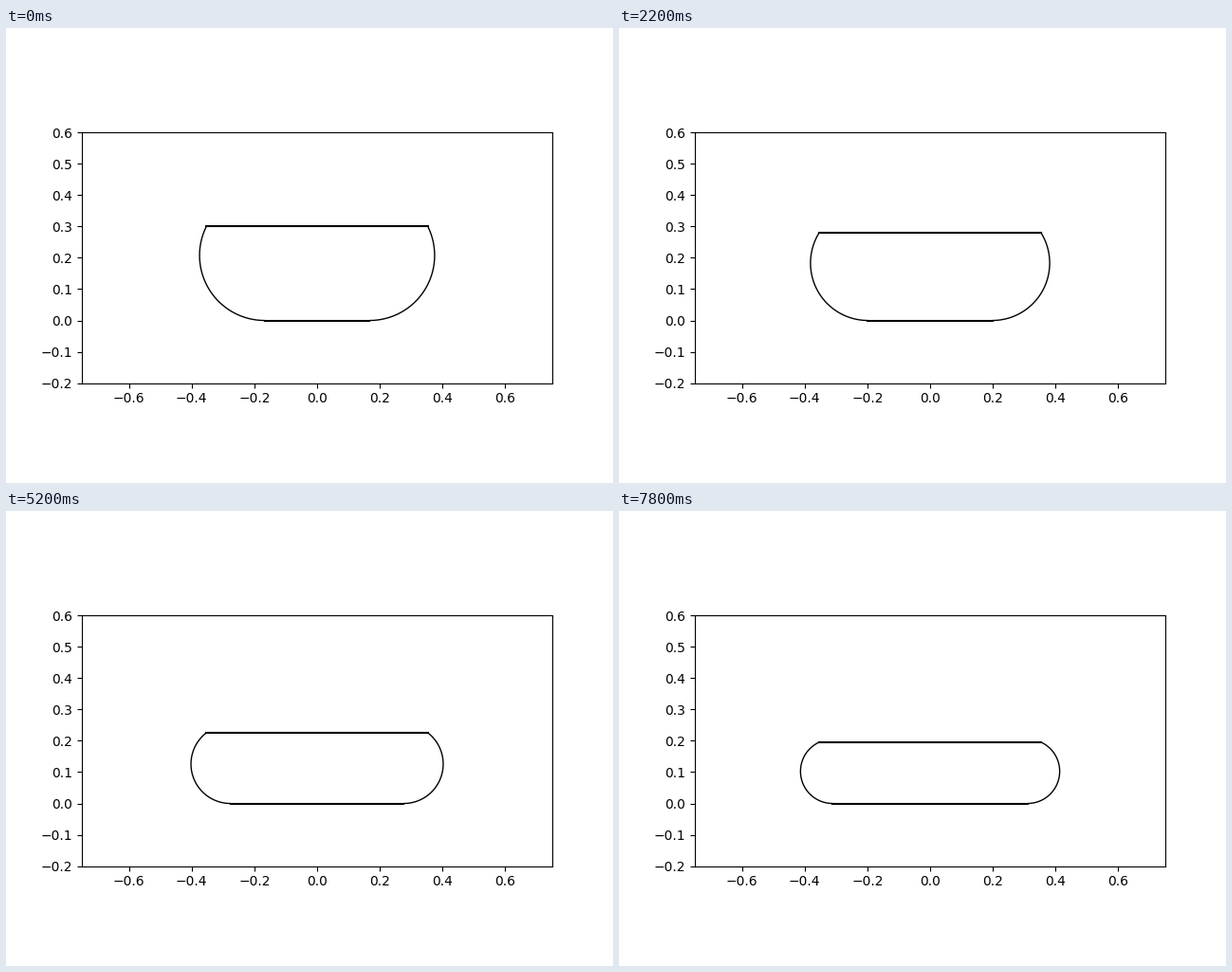
Recreate the animation shown at these times as a matplotlib script. Size 640 by 480 pixels, loop 8000 ms.

```python
import math

import matplotlib.pyplot as plt
import numpy as np
from matplotlib.animation import FuncAnimation

HALF_TOP = 0.353            # half width of the top plate
HALF_SKIN = 3 * math.pi / 16  # half length of the flexible skin
MASS, PRESSURE, GRAVITY = 100, 2000, 9.8
DT, FRAMES, INTERVAL = 0.01, 40, 200


def solve_side(height):
    """Return centre x, radius and upper angle of the right-hand arc."""
    low, high = 0.0, math.pi / 2
    for _ in range(50):
        angle = (low + high) / 2
        radius = height / (1 + math.sin(angle))
        centre = HALF_TOP - radius * math.cos(angle)
        if centre + radius * (math.pi / 2 + angle) < HALF_SKIN:
            low = angle
        else:
            high = angle
    return centre, radius, angle


def simulate():
    """Let the loaded plate sink onto the pressurised cushion."""
    height, speed, states = 0.3, 0.0, []
    for _ in range(FRAMES):
        side = solve_side(height)
        states.append((height, *side))
        speed += (PRESSURE * 2 * side[0] / MASS - GRAVITY) * DT
        height += speed * DT
    return states


states = simulate()

fig, ax = plt.subplots(figsize=(6.4, 4.8), dpi=100)
ax.set_aspect("equal")
ax.set(xlim=(-0.75, 0.75), ylim=(-0.2, 0.6))

top, = ax.plot([], [], color="black", lw=1.5)
bottom, = ax.plot([], [], color="black", lw=1.5)
left, right = (
    ax.plot([], [], color="black", lw=1, solid_capstyle="butt")[0]
    for _ in range(2)
)


def update(i):
    height, centre, radius, angle = states[i]
    theta = np.linspace(-math.pi / 2, angle, 90)
    x = centre + radius * np.cos(theta)
    y = radius + radius * np.sin(theta)
    top.set_data([-HALF_TOP, HALF_TOP], [height, height])
    bottom.set_data([-centre, centre], [0, 0])
    right.set_data(x, y)
    left.set_data(-x, y)
    return top, bottom, left, right


anim = FuncAnimation(fig, update, frames=FRAMES, interval=INTERVAL,
                     repeat=True, repeat_delay=0)
plt.show()
```
